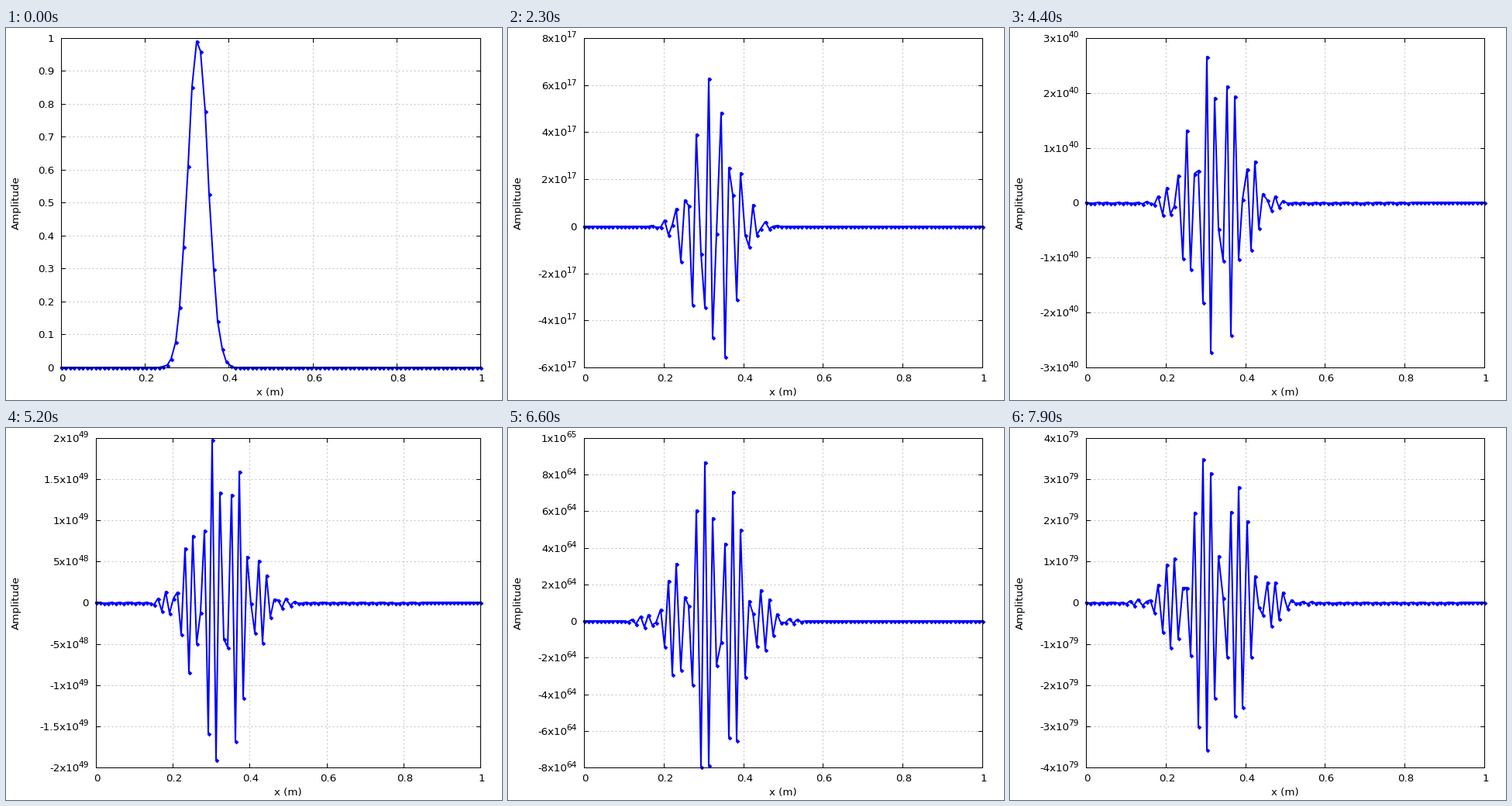
Recreate the animation shown at these times as a matplotlib script. Size 640 by 480 pixels, loop 8000 ms.

```python
import numpy as np
import matplotlib.pyplot as plt
from matplotlib.animation import FuncAnimation

W, H = 640, 480
DPI = 100
PX = 72 / DPI
FRAMES = 80
RIGHT, TOP, BOTTOM = 612, 13, 438
CHAR = 9
BLUE, GRID = "#0000ff", "#c0c0c0"

plt.rcParams["font.family"] = "DejaVu Sans"
plt.rcParams["axes.unicode_minus"] = False


def simulate(n=100, courant=2.0):
    """Explicit wave equation, run far beyond its stability limit."""
    u = np.exp(-(10 - 0.3 * np.arange(1, n + 1)) ** 2)
    prev = u.copy()
    rows = [u]
    for _ in range(FRAMES - 1):
        new = np.zeros(n)
        lap = u[2:] - 2 * u[1:-1] + u[:-2]
        new[1:-1] = 2 * u[1:-1] - prev[1:-1] + courant ** 2 * lap
        prev, u = u, new
        rows.append(u)
    return rows


def tic_step(span, guide=20):
    power = 10.0 ** np.floor(np.log10(span))
    room = guide / (span / power)
    for limit, step in ((40, 0.05), (20, 0.1), (10, 0.2), (4, 0.5), (2, 1)):
        if room > limit:
            return step * power
    return 2 * power


def split_label(value):
    """Return mantissa text and exponent text."""
    text = "%g" % value
    if "e" not in text:
        return text, ""
    mant, exp = text.split("e")
    return mant + "x10", str(int(exp))


def label_width(value):
    return len("".join(split_label(value))) + (value >= 0)


rows = simulate()
grid_x = np.linspace(0, 1, len(rows[0]))

fig = plt.figure(figsize=(W / DPI, H / DPI), dpi=DPI, facecolor="white")
ax = fig.add_axes([0, 0, 1, 1])
ax.set_xlim(0, W)
ax.set_ylim(H, 0)
ax.axis("off")


def segment(x0, y0, x1, y1, color="black", z=3, **kw):
    """One-pixel line through pixel centres."""
    ax.plot([x0 + 0.5, x1 + 0.5], [y0 + 0.5, y1 + 0.5], color=color,
            lw=PX, zorder=z, snap=False, **kw)


def label(x, y, s, ha="center", size=13.33, **kw):
    ax.text(x, y, s, ha=ha, va="baseline", fontsize=size * PX, zorder=4, **kw)


def grid_line(*ends):
    segment(*ends, color=GRID, z=1, linestyle=(0, (2, 3)),
            dash_capstyle="butt")


def draw(n):
    for artist in [*ax.lines, *ax.texts]:
        artist.remove()

    u = rows[n]
    step = tic_step(u.max() - u.min())
    lo, hi = int(np.floor(u.min() / step)), int(np.ceil(u.max() / step))
    ticks = [k * step for k in range(lo, hi + 1)]
    left = 35 + CHAR * max(label_width(t) for t in ticks)

    def to_x(x):
        return np.floor(left + (RIGHT - left) * x + 0.5)

    def to_y(v):
        t = (v / step - lo) / (hi - lo)
        return H - 1 - np.floor(H - 1 - BOTTOM + (BOTTOM - TOP) * t + 0.5)

    for k, t in enumerate(ticks):
        y = to_y(t)
        if 0 < k < len(ticks) - 1:
            grid_line(left, y, RIGHT, y)
        segment(left, y, left + 5, y)
        segment(RIGHT - 5, y, RIGHT, y)
        mant, exp = split_label(t)
        end = left - CHAR
        if exp:
            label(end - 6.8 * len(exp) + 1, y + 5, mant, ha="right")
            label(end, y - 0.5, exp, ha="right", size=10.67)
        else:
            label(end, y + 5, mant, ha="right")

    for k in range(6):
        x = to_x(k / 5)
        if 0 < k < 5:
            grid_line(x, BOTTOM, x, TOP)
        segment(x, BOTTOM, x, BOTTOM - 5)
        segment(x, TOP, x, TOP + 5)
        label(x + 1.6, 456, "%g" % (k / 5))

    # The two-pixel line sits on pixel edges, the dots on pixel centres.
    xs, ys = to_x(grid_x), to_y(u)
    ax.plot(xs, ys, color=BLUE, lw=2 * PX, zorder=2, snap=False)
    ax.plot(xs + 0.5, ys + 0.5, color=BLUE, ls="none", marker="D",
            ms=4.1 * PX, mew=0, zorder=2, snap=False)

    for y in (TOP, BOTTOM):
        segment(left, y, RIGHT, y)
    for x in (left, RIGHT):
        segment(x, TOP, x, BOTTOM)

    label((left + RIGHT) / 2 - 0.5, 474, "x (m)")
    label(17, 226, "Amplitude", rotation=90, rotation_mode="anchor")
    return []


anim = FuncAnimation(fig, draw, frames=FRAMES, init_func=lambda: [],
                     interval=100, repeat=True, repeat_delay=0)
plt.show()
```
